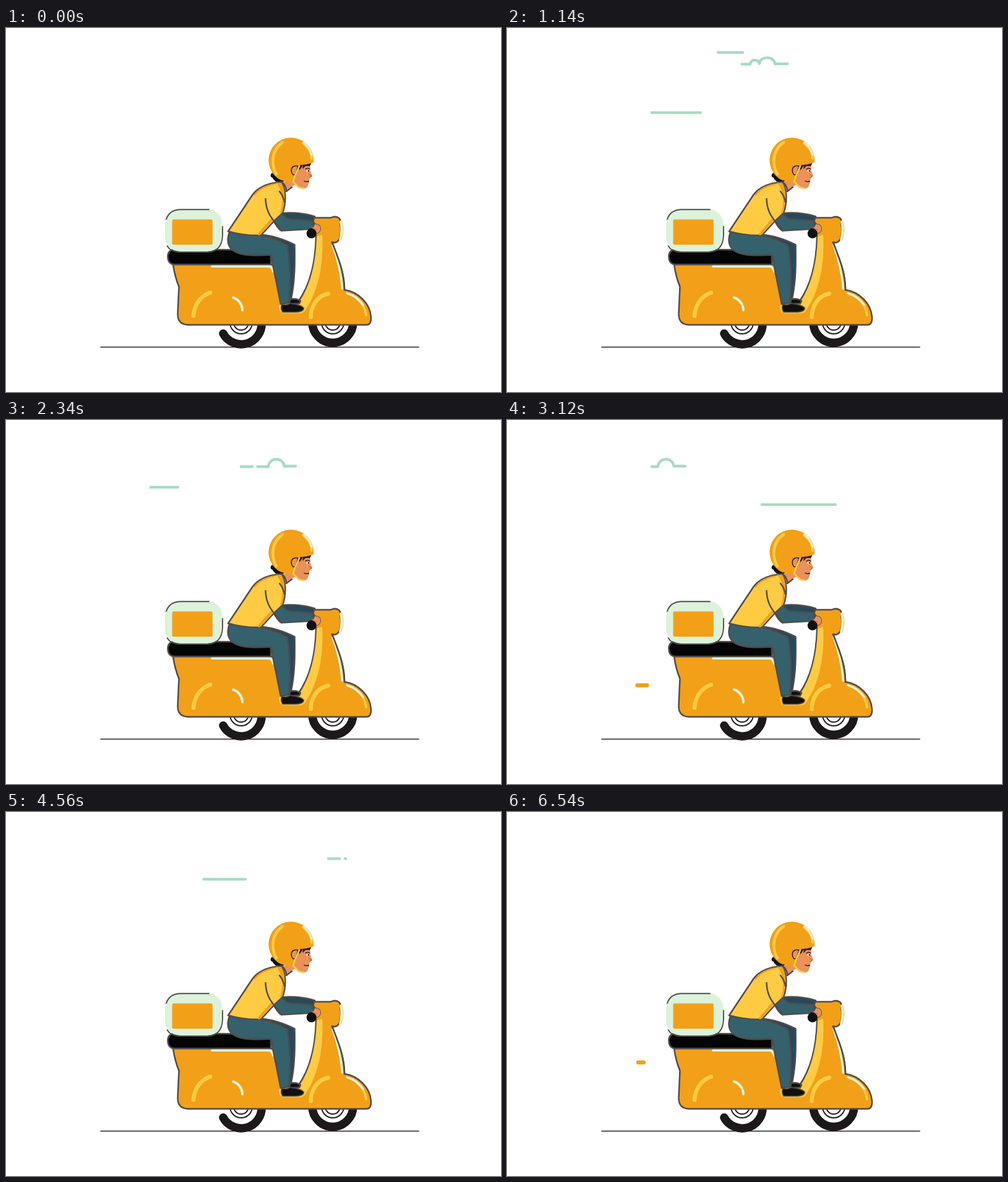
An HTML page that plays this animation: 800 px wide and 588 px high, repeating every 6570 ms.

```html
<!DOCTYPE html>
<html lang="en">
<head>
<meta charset="utf-8">
<title>Scooter delivery</title>
<style>
  html, body { margin: 0; width: 100%; height: 100%; overflow: hidden; background: #fff; }
  svg { display: block; width: 800px; height: 588px; }
  path, line { stroke-linecap: round; stroke-linejoin: round; }
  .line { fill: none; }
  .edge { stroke: #514b4c; stroke-width: 2.5; }
  .thin { fill: none; stroke: #231f20; stroke-width: 2; }
  .tyre { fill: none; stroke: #1d191a; stroke-width: 13.5; }
  .orange { fill: #f2a017; }
  .yellow { fill: #ffcb43; }
  .teal { fill: #35616c; }
  .navy { fill: #26495a; }
  .skin { fill: #ea9259; }
  .black { fill: #111012; }
  .shine { fill: none; stroke: #ffcb43; stroke-width: 6.5; }
  .mint { fill: none; stroke: #dcf2da; stroke-width: 4; }
  .sky { fill: none; stroke: #a6dbc1; stroke-width: 4.3; }
  .puff { stroke: #f2a017; stroke-width: 6.5; }
</style>
</head>
<body>
<svg viewBox="0 0 800 588">
  <defs>
    <clipPath id="view"><rect x="232" y="20" width="319" height="140"/></clipPath>
  </defs>

  <g clip-path="url(#view)">
    <g id="high"><path class="sky" d="M2.5 39.5H42.500M41 58.300H54.500C56 50 67 50 69.500 57.500C71 44.500 92.500 44.500 94.500 57.800H115"/></g>
    <g id="hill"><path class="sky" d="M2.200 75.300H20.800M29 75.300H46.500C48 59.500 70.500 59.500 72 74.500H90.500"/></g>
    <path id="long" class="sky" d="M-8 136.700H110.800"/>
    <path id="short" class="sky" d="M2.200 108.600H69.800"/>
  </g>
  <line id="puffA" class="puff" y1="404.600" y2="404.600"/>
  <line id="puffB" class="puff" y1="428.600" y2="428.600"/>

  <!-- wheels -->
  <path class="tyre" d="M351 493.500A33 33 0 0 0 413 475.500"/>
  <circle class="thin" cx="380" cy="476" r="18"/>
  <circle class="thin" cx="380" cy="476" r="12"/>
  <circle class="tyre" cx="528" cy="475.500" r="33"/>
  <circle class="thin" cx="528" cy="476" r="18"/>
  <circle class="thin" cx="528" cy="476" r="12"/>
  <path class="thin" style="stroke-width:1.600" d="M153 515.500H667"/>

  <!-- scooter -->
  <path class="orange edge" d="M270 382H436L452 441H473C491 415 500 380 501 338L499 316Q492 308 499 306.500H525Q532 303 538 307Q542 311 540 316Q543 330 539 340Q535 349 527 346C536 370 547 394 547 423C569 426 589 445 590 468Q590 479.500 583 479.500H294Q277.500 479 277.500 462L279.500 418Q273 402 270 382Z"/>
  <path class="yellow" d="M502 337L511 334C514 386 503 428 483 457Q480 461 473 461H447Q441 459 441 448L447 446L474 443C492 415 501 380 502 337Z"/>
  <path class="mint" d="M541 313Q544.500 327 540 342"/>
  <path class="line" stroke="#f5d778" stroke-width="1.300" d="M543.500 313Q547.500 328 542 342"/>
  <path class="mint" style="stroke-width:3.600" d="M528 351C535 370 541 392 543.500 421"/>
  <path class="line edge" d="M527 346C536 370 547 394 547 423"/>
  <path class="shine" d="M492.500 467C493 448 503 433 521 429"/>
  <path class="shine" style="stroke-width:4" d="M567 437Q580 447 582 464"/>
  <path class="mint" style="stroke-width:3.600" d="M551 428.500Q567 433 577 447"/>
  <path class="shine" d="M303 465C304 447 314 433 330 427.500"/>
  <path class="mint" d="M367 435.500C375 438 382 446 382 456"/>
  <path class="mint" d="M333 385H426Q430 387 432 393"/>
  <path class="edge" fill="#050505" d="M272 357.500Q261 359 261.500 370Q262 381.500 272 382H428V367L400 358.500Z"/>

  <!-- parcel box -->
  <rect x="257" y="292.500" width="92.500" height="68.500" rx="24" fill="#dcf2da"/>
  <path class="line edge" style="stroke-width:1.900" d="M259 309Q264 294 281 293.300H328M350 321V335Q349 361 326 362H281Q266 362 260.500 352"/>
  <rect class="orange" x="268.500" y="309.300" width="65.300" height="40.700" rx="2.500"/>

  <!-- legs -->
  <path class="black edge" d="M459 438Q470 436 476 441L474 445L458 446Z"/>
  <path class="navy edge" d="M412 334C431 335 450 342 466.500 350C467 380 467 408 461 437L448 442L440 366Z"/>
  <path class="teal edge" d="M361 330Q355 347 364 357C374 368 397 368 428 366.500L444 446L457 444C460 410 460 380 454 351Q436 341 412 334Z"/>
  <path class="line" stroke="#40545b" stroke-width="1.500" d="M400 366H428Q431 367 432 377"/>
  <path class="black edge" style="stroke-width:1.500" d="M446 446Q452 449 459 445Q477 447 481 452Q482 458 469 459H447Q443 453 446 446Z"/>

  <!-- neck and head -->
  <path class="skin" d="M447 249L466 243L468 253Q458 257 453 263Z"/>
  <path class="black" d="M430 236L453 246L448 248L436 248Q429 243 430 236Z"/>
  <circle class="black" cx="431.500" cy="238" r="3.800"/>
  <path class="skin" d="M470 220L492 218L491.500 230L495 239L490.500 242.500L490 249L487 257Q482 261 476 258L462 247V225Z"/>
  <path fill="#2b1b1b" d="M473 222L494 217L491 223L484 223L479 228L480 222L474 230Z"/>
  <path class="line" stroke="#2b1b1b" stroke-width="1.400" d="M484 228Q487 225 491 228M482 247Q485 249.500 489 247.500"/>
  <path fill="#fff" d="M485 230L491 229.500L490 233L486 232Z"/>
  <circle class="black" cx="489" cy="231" r="1.300"/>
  <path class="line" stroke="#c86843" stroke-width="1.200" d="M490 237L494 239L490 242"/>
  <path class="orange" d="M497 217A36.400 36.400 0 1 0 440 243.500Q452 250 465 247L467 234L473 221.500Q487 221 497 217Z"/>
  <path class="shine" style="stroke-width:4.500" d="M437 236C427 219 430 196 447 185"/>
  <path class="shine" style="stroke-width:4" d="M480 186Q494 197 494 211"/>
  <path class="mint" style="stroke-width:3" d="M481 185Q491 193 494 205"/>
  <path class="skin" stroke="#2b1b1b" stroke-width="1.500" d="M472 223Q462 221 461 230Q462 239 468 237Z"/>
  <path class="shine" style="stroke-width:2.600" d="M474 223L467 239L464 248L473 257.500L481 259"/>

  <!-- arms and torso -->
  <path class="navy edge" d="M446 299Q475 297 499 304.500L496 313H450Z"/>
  <path class="skin" stroke="#514b4c" stroke-width="1" d="M491 319Q501 314 507 319Q511 326 505 331L498 333L490 326Z"/>
  <path class="teal edge" d="M432 310L447 299Q452 310 465 309L494 311L498 317Q494 326 488 325L445 327.500Q438 323 432 310Z"/>
  <circle class="black" cx="493.700" cy="331.800" r="8"/>
  <path class="line" stroke="#d97943" stroke-width="1.200" d="M494 322L503 326"/>
  <path class="yellow edge" d="M359 328.500L398 270C408 256 427 250 445 248.500C452 259 454 279 447 299L433 312L412 335Q385 336 359 328.500Z"/>
  <path class="orange" d="M437 250L445 250C452 262 452 280 446 298L443 300C448 282 448 264 437 250Z"/>
  <path class="line" stroke="#f2a017" stroke-width="4" d="M430 309L409 333"/>
  <path class="line" stroke="#f2a017" stroke-width="2.500" d="M402 269Q413 256 432 252.500"/>
  <path class="line edge" d="M419.500 276C420 292 425 302 434 313L445 327M442 264Q448 271 450 281"/>
  <path class="line edge" d="M446 249Q453 255 453 264L462 257"/>
</svg>
<script>
const LOOP = 6570, STEP = 30, PUFF_LOOP = 630;

// Each pass: [time, left edge at that time, px per ms moving left]
const drifts = {
  high:  [[1140, 338.5, 0.36], [3740, 338.5, 0.36]],
  hill:  [[2340, 377.5, 0.2308], [4560, 518.7, 0.2595]],
  long:  [[1140, 202, 0.335], [3120, 420, 0.335]],
  short: [[2340, 208, 0.303], [4560, 317, 0.303]]
};

// Each key: [time, left cap centre, right cap centre]
const puffs = {
  puffA: [[165, 241, 241], [240, 212.2, 220.8], [285, 198.3, 208], [330, 198.3, 198.3]],
  puffB: [[515, 249, 249], [600, 210.7, 226.3], [628, 198.3, 198.3]]
};

const el = id => document.getElementById(id);
const lerp = (a, b, p) => a + (b - a) * p;

function drawDrift(id, t) {
  const spots = drifts[id].map(([at, left, speed]) => left - (t - at) * speed);
  const x = spots.find(s => s > 80 && s < 551);
  el(id).setAttribute("transform", `translate(${x ?? -900} 0)`);
}

function drawPuff(id, t) {
  const keys = puffs[id], line = el(id);
  const i = keys.findIndex((k, n) => n + 1 < keys.length && t >= k[0] && t < keys[n + 1][0]);
  line.style.display = i < 0 ? "none" : "";
  if (i < 0) return;
  const a = keys[i], b = keys[i + 1], p = (t - a[0]) / (b[0] - a[0]);
  line.setAttribute("x1", lerp(a[1], b[1], p));
  line.setAttribute("x2", lerp(a[2], b[2], p));
}

function draw(now) {
  const t = Math.floor((now % LOOP) / STEP) * STEP;
  Object.keys(drifts).forEach(id => drawDrift(id, t));
  Object.keys(puffs).forEach(id => drawPuff(id, t % PUFF_LOOP));
}

const start = performance.now();
function tick() {
  draw(performance.now() - start);
  requestAnimationFrame(tick);
}
tick();
</script>
</body>
</html>
```
